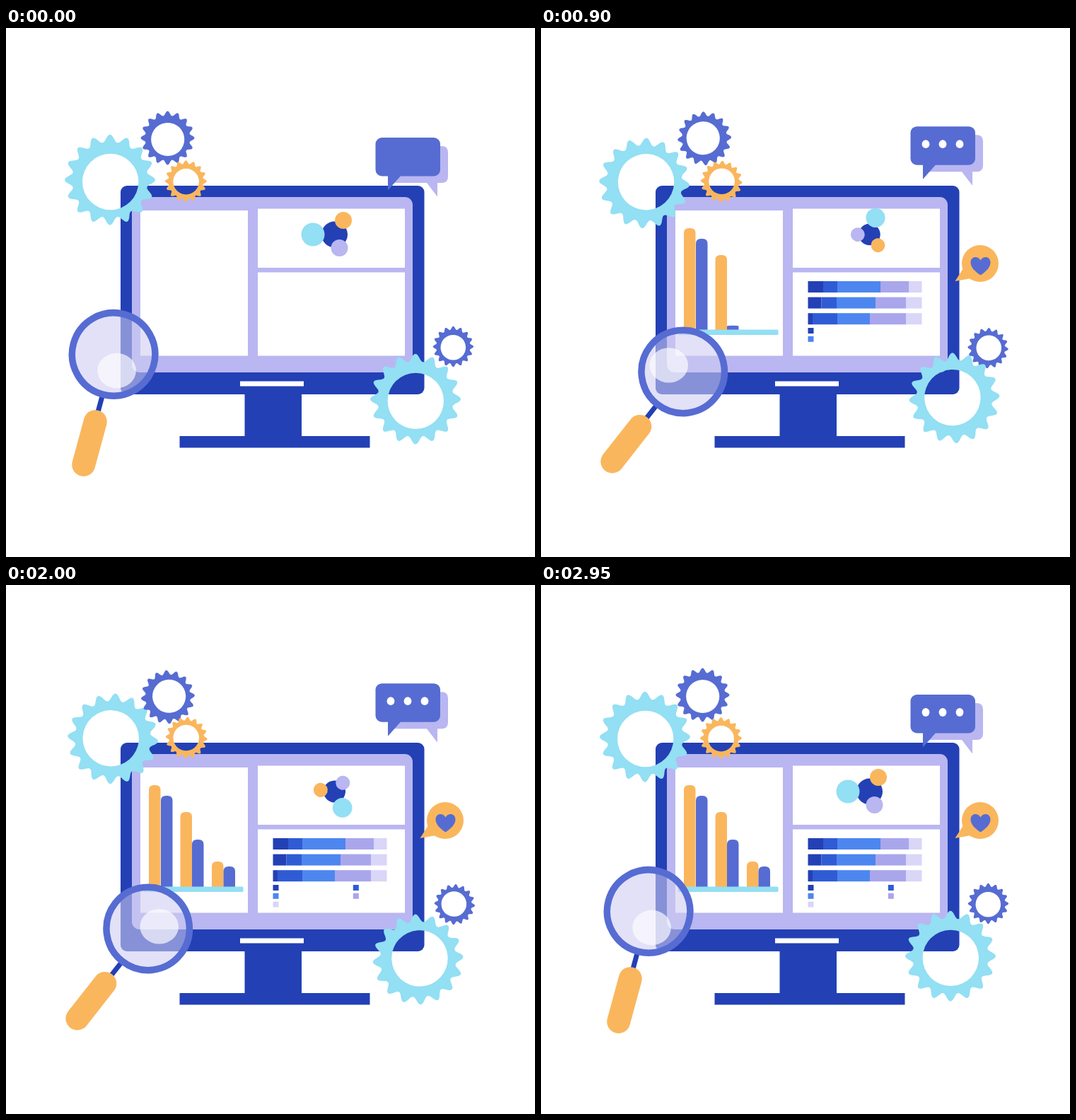
Recreate the animation shown at these times as an HTML page. Size 748 by 748 pixels, loop 3 s.

```html
<!DOCTYPE html>
<html lang="en">
<head>
<meta charset="utf-8">
<title>Data analysis</title>
<style>
  html, body { margin: 0; width: 100%; height: 100%; overflow: hidden; background: #fff; }
  svg { display: block; width: 100vw; height: 100vh; }
  .navy { fill: #2340b5; }
  .indigo { fill: #566cd2; }
  .royal { fill: #2f5bd5; }
  .sky { fill: #4d86ef; }
  .lilac { fill: #b9b6f1; }
  .mauve { fill: #aaa6ec; }
  .pale { fill: #d9d6f8; }
  .cyan { fill: #93dff3; }
  .orange { fill: #fab65d; }
  .white { fill: #fff; }
</style>
</head>
<body>
<svg viewBox="0 0 748 748">
  <g id="monitor">
    <rect class="navy" x="162" y="223" width="429.500" height="295" rx="9"/>
    <rect class="navy" x="337.500" y="510" width="80.500" height="70"/>
    <rect class="navy" x="245.500" y="577" width="269" height="16.500"/>
    <rect class="lilac" x="178" y="239" width="397" height="248" rx="11"/>
    <rect class="white" x="190" y="258" width="152" height="205.500"/>
    <rect class="white" x="356" y="255.500" width="208" height="83.500"/>
    <rect class="white" x="356" y="345.500" width="208" height="118"/>
    <rect class="white" x="331" y="499.500" width="90" height="7"/>
  </g>
  <g id="columns"></g>
  <rect id="axis" class="cyan" x="194" y="426.500" height="7.500" rx="1.500"/>
  <g id="rows"></g>
  <g id="squares"></g>
  <g id="molecule">
    <circle class="navy" r="18.500"/>
    <circle class="cyan" cx="-30.500" r="16.500"/>
    <circle class="orange" cx="12.500" cy="-20" r="12"/>
    <circle class="lilac" cx="7" cy="19" r="12"/>
  </g>
  <g id="gears"></g>
  <g id="chat">
    <path class="lilac" d="M547 167H616Q625 167 625 176V210Q625 219 616 219H610V238.500L595 219H547Z"/>
    <path class="indigo" d="M540 207H560L540 229.500Z"/>
    <rect class="indigo" x="522.500" y="155" width="91.500" height="54.500" rx="9"/>
    <g id="dots"></g>
  </g>
  <g id="like">
    <path class="orange" d="M585.500 358L597 340L608 354Z"/>
    <circle class="orange" cx="621" cy="333" r="26"/>
    <path class="indigo" d="M621.500 349.500C613 344 607.500 338 607.500 331.500C607.500 323 617.500 321.500 621.500 328.500C625.500 321.500 635.500 323 635.500 331.500C635.500 338 630 344 621.500 349.500Z"/>
  </g>
  <g id="glass">
    <rect class="navy" x="-3.500" y="-80" width="7" height="32"/>
    <rect class="orange" x="-16.500" y="-54.500" width="33" height="96" rx="16.500"/>
    <circle cy="-136.600" r="58.700" fill="#cdcbf2" fill-opacity=".58" stroke="#566cd2" stroke-width="9.500"/>
  </g>
  <ellipse id="shine" rx="27.300" ry="24.700" fill="#fff" fill-opacity=".66"/>
</svg>
<script>
const LOOP = 3000, STEP = 50, TURN = 2950, SWING = 1450;
const $ = id => document.getElementById(id);
const clamp = x => Math.max(0, Math.min(1, x));
const ramp = (t, start, span) => clamp((t - start) / span);

function add(parent, tag, attrs) {
  const el = document.createElementNS('http://www.w3.org/2000/svg', tag);
  for (const k in attrs) el.setAttribute(k, attrs[k]);
  return parent.appendChild(el);
}
const move = (el, value) => el.setAttribute('transform', value);
const show = (el, on) => el.setAttribute('visibility', on ? 'visible' : 'hidden');

// Toothed ring: outer outline around (ox, oy), hole around (hx, hy), both relative to the axle
function gearPath(r, ox, oy, hx, hy) {
  const teeth = 16, count = teeth * 14, hole = r * 0.62, pts = [];
  for (let i = 0; i < count; i++) {
    const a = i / count * 2 * Math.PI;
    const wave = Math.pow(0.5 + 0.5 * Math.cos(a * teeth), 1.15);
    const d = r * (0.835 + 0.165 * wave);
    pts.push((ox + d * Math.sin(a)).toFixed(2) + ' ' + (oy - d * Math.cos(a)).toFixed(2));
  }
  return `M${pts.join('L')}ZM${hx - hole} ${hy}a${hole} ${hole} 0 1 0 ${2 * hole} 0a${hole} ${hole} 0 1 0 ${-2 * hole} 0Z`;
}

// axle x, y, radius, colour, direction, outline offset, hole offset
const gears = [
  [148.2, 217.3, 64, 'cyan', -1, -1.2, -2.6, -0.5, 0.2],
  [229.6, 156.8, 38, 'indigo', 1, -1.1, -1.3, -0.9, 0.7],
  [255, 216.6, 29.5, 'orange', -1, -0.6, 0, -0.4, 0.5],
  [633, 451.7, 28.7, 'indigo', -1, -0.6, -1.2, -0.7, 0],
  [582.3, 525.9, 64, 'cyan', 1, -3.3, -1.2, -3, 1.5]
].map(([x, y, r, cls, dir, ...offsets]) => ({
  x, y, dir,
  el: add($('gears'), 'path', { class: cls, 'fill-rule': 'evenodd', d: gearPath(r, ...offsets) })
}));

// left edge and height of each column
const columns = [[202, 144], [219, 129], [246.5, 106], [263, 67], [291, 36], [307.5, 29]].map(([x, h], i) =>
  add($('columns'), 'path', {
    class: i % 2 ? 'indigo' : 'orange',
    d: `M0 0V${7 - h}Q0 ${-h} 7 ${-h}H9.500Q16.500 ${-h} 16.500 ${7 - h}V0Z`,
    'data-x': x
  }));

// right edges of the five segments in each row
const shades = ['navy', 'royal', 'sky', 'mauve', 'pale'];
const rows = [[21.5, 41.5, 102.5, 143, 161], [19, 40.5, 95.5, 138.5, 161], [6.5, 41.5, 87.5, 138.5, 161]].map(ends => {
  const g = add($('rows'), 'g', {});
  ends.forEach((end, i) => {
    const x = i ? ends[i - 1] : 0;
    add(g, 'rect', { class: shades[i], x, width: end - x, height: 16 });
  });
  return g;
});

const squares = [[0, 0, 'navy'], [0, 1, 'sky'], [0, 2, 'pale'], [1, 0, 'royal'], [1, 1, 'mauve']].map(([c, r, cls]) =>
  add($('squares'), 'rect', { class: cls, x: 377.5 + 113.3 * c, y: 424 + 11.8 * r, width: 8, height: 8 }));

const dots = [544, 568, 592].map(cx =>
  add($('dots'), 'ellipse', { class: 'white', cx, cy: 180, rx: 5.4, ry: 5.9 }));

// time, then shine position relative to the lens
const shinePath = [
  [0, 4.5, 23], [250, -7, 19], [500, -16, 10], [900, -20, -9], [1200, -10, -17], [1550, 6, -15],
  [2000, 16, -3], [2300, 16, 7], [2550, 12.5, 15], [2950, 4.5, 23]
];
function shineAt(t) {
  const i = Math.max(1, shinePath.findIndex(p => p[0] >= t));
  const [t0, x0, y0] = shinePath[i - 1], [t1, x1, y1] = shinePath[i];
  const k = (t - t0) / (t1 - t0);
  return [x0 + (x1 - x0) * k, y0 + (y1 - y0) * k];
}

function draw(t) {
  const turn = t / TURN;
  const swing = clamp(1 - Math.abs(t - SWING) / SWING);

  for (const g of gears) move(g.el, `translate(${g.x} ${g.y}) rotate(${g.dir * 360 * turn})`);

  const pulse = 0.9 + 0.1 * Math.cos(4 * Math.PI * turn);
  move($('molecule'), `translate(464.5 292) rotate(${360 * turn}) scale(${pulse})`);

  $('axis').setAttribute('width', 141.5 * ramp(t, 0, 250));
  columns.forEach((el, i) =>
    move(el, `translate(${el.dataset.x} 427) scale(1 ${ramp(t, 25 + 283 * i, 283)})`));
  rows.forEach((el, i) =>
    move(el, `translate(377.5 ${358 + 22.6 * i}) scale(${ramp(t, 179 - 68 * i, 550)} 1)`));
  squares.forEach((el, i) => show(el, t >= 400 + 275 * i));

  move($('chat'), `translate(0 ${-25.5 * swing})`);
  dots.forEach((el, i) => show(el, t >= 200 + 200 * i));
  const pop = ramp(t, 150, 200);
  move($('like'), `translate(586 358) scale(${pop}) translate(-586 -358)`);

  const px = 116.3, py = 593.3, angle = 15.2 + 37 * swing;
  move($('glass'), `translate(${px} ${py}) rotate(${angle})`);
  const a = angle * Math.PI / 180, [sx, sy] = shineAt(t);
  move($('shine'), `translate(${px + 136.6 * Math.sin(a) + sx} ${py - 136.6 * Math.cos(a) + sy})`);
}

const begin = performance.now();
function tick() {
  const t = (performance.now() - begin) % LOOP;
  draw(Math.floor(t / STEP) * STEP);
  requestAnimationFrame(tick);
}
tick();
</script>
</body>
</html>
```
